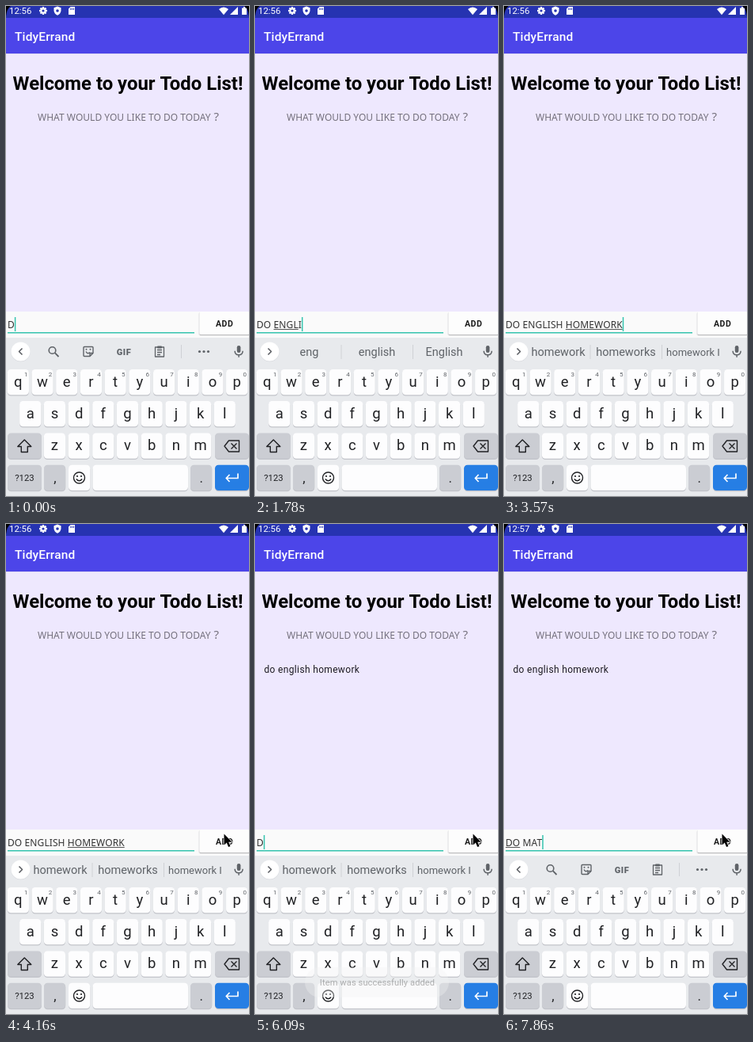
Write an HTML page with a canvas that moves like this. It is 307 px wide and 619 px high and loops after 8 s.

```html
<!DOCTYPE html>
<html lang="en">
<head>
<meta charset="utf-8">
<title>Todo list demo</title>
<style>
  html, body { margin: 0; width: 100%; height: 100%; overflow: hidden; background: #e8eaed; }
  canvas { display: block; width: 307px; height: 619px; }
</style>
</head>
<body>
<canvas id="stage"></canvas>
<script>
const W = 307, H = 619, LOOP = 8000;
const canvas = document.getElementById('stage');
const ctx = canvas.getContext('2d');
const ratio = window.devicePixelRatio || 1;
canvas.width = W * ratio;
canvas.height = H * ratio;

const ROBOTO = 'Roboto, sans-serif', CAPS = '"Noto Sans", sans-serif';
const GRAY = '#5f6368', INK = '#202124', TEAL = '#35c4ae';
const TOOLS = null;

// Each step overrides part of the state; `mark` is the underlined character range.
const steps = [
  [0, { text: 'D', mark: [0, 0], chips: TOOLS, caret: true, clock: '12:56', press: 0, mouse: null, item: false }],
  [150, { text: 'DO' }],
  [300, { mark: [0, 2] }],
  [450, { chips: ['do', 'don\'t', 'does'] }],
  [600, { text: 'DO ', mark: [0, 0] }],
  [740, { chips: ['you', 'not', 'the'] }],
  [1180, { chips: TOOLS }],
  [1480, { text: 'DO EN' }],
  [1630, { text: 'DO ENGL', mark: [3, 5] }],
  [1780, { text: 'DO ENGLI', mark: [3, 7], chips: ['eng', 'english', 'English'] }],
  [1930, { text: 'DO ENGLISH', mark: [3, 8] }],
  [2080, { text: 'DO ENGLISH ', mark: [0, 0] }],
  [2220, { text: 'DO ENGLISH H' }],
  [2370, { text: 'DO ENGLISH HO', mark: [11, 13] }],
  [2670, { text: 'DO ENGLISH HOM', mark: [11, 14] }],
  [2970, { text: 'DO ENGLISH HOMEW', chips: ['hom', 'homework', 'him'] }],
  [3120, { text: 'DO ENGLISH HOMEWO', mark: [11, 16] }],
  [3270, { text: 'DO ENGLISH HOMEWOR' }],
  [3420, { text: 'DO ENGLISH HOMEWORK', mark: [11, 18] }],
  [3560, { mark: [11, 19], chips: ['homework', 'homeworks', 'homework I'] }],
  [3710, { mouse: [262, 531] }],
  [3860, { mouse: [268, 470] }],
  [4010, { mouse: [272.5, 398] }],
  [4160, { mouse: [275.5, 391.5], caret: false }],
  [4610, { press: 0.5 }],
  [4760, { press: 0.85 }],
  [5050, { text: '', mark: [0, 0], caret: true, press: 1 }],
  [5200, { press: 0 }],
  [5500, { item: true }],
  [5790, { text: 'D' }],
  [6530, { mark: [0, 1] }],
  [6970, { text: 'DO', mark: [0, 2] }],
  [7120, { chips: TOOLS }],
  [7420, { text: 'DO ' }],
  [7720, { text: 'DO M', clock: '12:57' }],
  [7860, { text: 'DO MAT' }],
];

const stateAt = t => Object.assign({}, ...steps.filter(s => s[0] <= t).map(s => s[1]));
const clamp = v => Math.max(0, Math.min(1, v));

function rect(x, y, w, h, color, r = 0) {
  ctx.fillStyle = color;
  ctx.beginPath();
  ctx.roundRect(x, y, w, h, r);
  ctx.fill();
}

function label(text, x, y, size, color, { weight = 400, align = 'left', font = ROBOTO, spacing = 0 } = {}) {
  ctx.font = `${weight} ${size}px ${font}`;
  ctx.letterSpacing = spacing + 'px';
  ctx.textAlign = align;
  ctx.fillStyle = color;
  ctx.fillText(text, x, y);
}

function fillPath(d, color, x = 0, y = 0) {
  ctx.save();
  ctx.translate(x, y);
  ctx.fillStyle = color;
  ctx.fill(new Path2D(d), 'evenodd');
  ctx.restore();
}

function strokePath(d, color, x = 0, y = 0, width = 1.4) {
  ctx.save();
  ctx.translate(x, y);
  ctx.strokeStyle = color;
  ctx.lineWidth = width;
  ctx.lineJoin = 'round';
  ctx.stroke(new Path2D(d));
  ctx.restore();
}

const circle = r => `M${-r} 0a${r} ${r} 0 1 0 ${2 * r} 0a${r} ${r} 0 1 0 ${-2 * r} 0z`;

function drawHeader(s) {
  rect(0, 0, W, 15, '#2633b1');
  rect(0, 15, W, 45, '#4c45e9');
  label(s.clock, 4, 10, 11.4, '#fff');
  // gear, shield, memory card
  for (let i = 0; i < 4; i++) {
    ctx.save();
    ctx.translate(47, 6);
    ctx.rotate(i * Math.PI / 4);
    rect(-1.1, -5, 2.2, 10, '#fff');
    ctx.restore();
  }
  fillPath(circle(3.7), '#fff', 47, 6);
  fillPath(circle(1.6), '#2633b1', 47, 6);
  fillPath('M0-5.5L4.5-3.7V0Q4 4 0 5.7Q-4 4-4.5 0V-3.7z', '#fff', 65, 6);
  fillPath(circle(1.8), '#2633b1', 65, 6);
  fillPath('M-1.5-5H4V5H-4V-2.5zM-1.7-3.5V-1H-.8V-3.5zM.2-3.5V-1H1.1V-3.5zM2-3.5V-1H2.9V-3.5z', '#fff', 83, 6);
  // wifi, signal, battery
  fillPath('M275 11.3L269 4Q275-1 281 4z', '#fff');
  fillPath('M283 11H293V1z', '#fff');
  fillPath('M298 2.5H300V1H302V2.5H304V11H298z', '#fff');
  fillPath('M0 0H6Q1 3 0 13z', '#000');
  fillPath('M307 0H301Q306 3 307 13z', '#000');
  label('TidyErrand', 11, 44, 15.5, '#fff', { weight: 500, spacing: 0.15 });
}

function drawContent(s) {
  rect(0, 60, W, 326, '#eee8fe');
  rect(0, 60, W, 1, '#dcd6f3');
  label('Welcome to your Todo List!', 154, 106, 23.9, '#000', { weight: 700, align: 'center' });
  label('WHAT WOULD YOU LIKE TO DO TODAY', 40, 145, 12, '#75717d', { font: CAPS, spacing: 0.03 });
  label('?', 262.5, 145, 15, '#75717d', { font: CAPS });
  if (s.item) label('do english homework', 11.5, 188, 11.95, '#1d1b22', { spacing: 0.37 });
}

function drawInput(s) {
  rect(0, 386, W, 33, '#fafafa');
  const style = { font: CAPS, spacing: 0.1 };
  label(s.text || 'ADD AN ITEM TO YOUR TODO LIST', 2, 406.5, 12, s.text ? '#333' : '#929292',
    s.text ? style : { font: CAPS, spacing: 0.2 });
  const widthOf = n => ctx.measureText(s.text.slice(0, n)).width;
  const [from, to] = s.mark;
  if (to > from) rect(2 + widthOf(from), 408, widthOf(to) - widthOf(from), 1, '#555');
  rect(2, 412, 236, 1.5, TEAL);
  if (s.caret) rect(2 + widthOf(s.text.length), 393, 1.5, 18, TEAL);

  const shade = Math.round(253 - 31 * s.press);
  rect(243.5, 387, 64, 29.5, '#dedee0', 2);
  rect(244.5, 386, 63, 29, `rgb(${shade},${shade},${shade})`, 2);
  rect(245, 415, 62, 1, '#bdbdbf');
  label('ADD', 276.2, 405, 10.5, '#1a1a1a', { weight: 700, align: 'center', spacing: 0.6 });
}

function drawTools() {
  strokePath(circle(4.3), GRAY, 58.5, 435, 1.6);
  strokePath('M61.7 438.2L66.5 443', GRAY, 0, 0, 1.8);
  strokePath('M-5-6H5Q6-6 6-5V2L2 6H-5Q-6 6-6 5V-5Q-6-6-5-6zM6 2H2V6M-3 0Q-1 4 2 1', GRAY, 104, 436.5);
  fillPath(circle(1), GRAY, 101.5, 433.8);
  fillPath(circle(1), GRAY, 106.5, 433.8);
  label('GIF', 149, 440.5, 11, GRAY, { weight: 900, align: 'center', spacing: 0.5 });
  strokePath('M-5.5-5.5H5.5V6.5H-5.5zM-3-2H3M-3 1H3M-3 4H1', GRAY, 194, 436.5, 1.3);
  rect(191, 429.5, 6, 3, GRAY, 1);
  rect(221, 428, 1, 17, '#cfd1d5');
  for (const x of [244.5, 250, 255.5]) fillPath(circle(1.6), GRAY, x, 436.5);
}

function drawSuggestions(chips) {
  chips.forEach((word, i) => {
    label(word, [68.5, 154, 239][i], 442, word.length > 9 ? 13 : 14.5, GRAY, { align: 'center' });
  });
  rect(108.5, 428, 1, 18, '#cfd1d5');
  rect(199, 428, 1, 18, '#cfd1d5');
}

function drawStrip(s) {
  fillPath(circle(12.2), '#d9dbdf', 18.5, 437);
  fillPath(circle(12), '#fff', 18.5, 436.5);
  strokePath(s.chips ? 'M-2-4L2 0L-2 4' : 'M2-4L-2 0L2 4', '#55585d', 18.5, 436.5, 1.5);
  if (s.chips) drawSuggestions(s.chips); else drawTools();
  rect(291.8, 429, 4.6, 9, GRAY, 2.3);
  strokePath('M-5 0Q-5 5 0 5Q5 5 5 0M0 5V8', GRAY, 294.1, 435.7, 1.5);
}

function key(x, y, w, color = '#fdfdfe') {
  rect(x, y + 1, w, 32.5, '#c1c3c9', 4.5);
  rect(x, y, w, 32.3, color, 4.5);
}

function drawKeys() {
  const pitch = 30.7, dark = '#cbcdd3';
  [['qwertyuiop', 15.35, 459], ['asdfghjkl', 30.7, 499], ['zxcvbnm', 61.4, 539.5]].forEach(([letters, start, y], row) => {
    [...letters].forEach((ch, i) => {
      const cx = start + i * pitch;
      key(cx - 13.6, y, 27.2);
      label(ch, cx, y + 21.8, 18.5, INK, { align: 'center' });
      if (row === 0) label((i + 1) % 10, cx + 10, y + 9, 8, GRAY, { align: 'center' });
    });
  });

  key(2, 539.5, 43, dark);
  strokePath('M0-8L8.5 .5H4V7.5H-4V.5H-8.5z', INK, 23.3, 556);
  key(264, 539.5, 43, dark);
  strokePath('M-4-7H9V7H-4L-9.5 0zM-1-3.5L6 3.5M6-3.5L-1 3.5', INK, 285.5, 556);

  key(2, 579.8, 43, dark);
  label('?123', 23.4, 600, 11.3, INK, { align: 'center' });
  key(48, 579.8, 27.2, dark);
  label(',', 62, 602, 17, INK, { align: 'center' });
  key(79, 579.8, 27.2);
  strokePath(circle(7), INK, 92.5, 596);
  strokePath('M-3.7 1.5Q0 6 3.7 1.5', INK, 92.5, 596);
  fillPath(circle(1.1), INK, 90, 594);
  fillPath(circle(1.1), INK, 95, 594);
  key(109.5, 579.8, 120.5);
  key(233, 579.8, 27.2, dark);
  label('.', 246.7, 602, 17, INK, { align: 'center' });
  key(264, 579.8, 43, '#267ee4');
  strokePath('M7.5-5V1H-7M-3-3.5L-7.3 1L-3 5.5', '#fff', 285.5, 595.5, 1.7);
}

function drawToast(t) {
  const alpha = Math.min(clamp((t - 5990) / 290), clamp((7400 - t) / 300));
  if (alpha <= 0) return;
  ctx.globalAlpha = alpha;
  rect(63, 560, 182, 38, '#efeff0', 19);
  label('Item was successfully added', 154.5, 583, 11.1, '#2c2c2c', { align: 'center', spacing: 0.1 });
  ctx.globalAlpha = 1;
}

function drawMouse([x, y]) {
  const arrow = 'M0 0V14L3.2 11L5.6 16.5L8 15.5L5.6 10.2H10z';
  strokePath(arrow, 'rgba(255,255,255,.85)', x, y, 1.4);
  fillPath(arrow, '#000', x, y);
}

function draw(now) {
  const t = now % LOOP, s = stateAt(t);
  ctx.setTransform(ratio, 0, 0, ratio, 0, 0);
  rect(0, 0, W, H, '#e8eaed');
  drawHeader(s);
  drawContent(s);
  drawInput(s);
  drawStrip(s);
  drawKeys();
  drawToast(t);
  if (s.mouse) drawMouse(s.mouse);
}

const start = performance.now();
function tick() {
  draw(performance.now() - start);
  requestAnimationFrame(tick);
}
tick();
</script>
</body>
</html>
```
